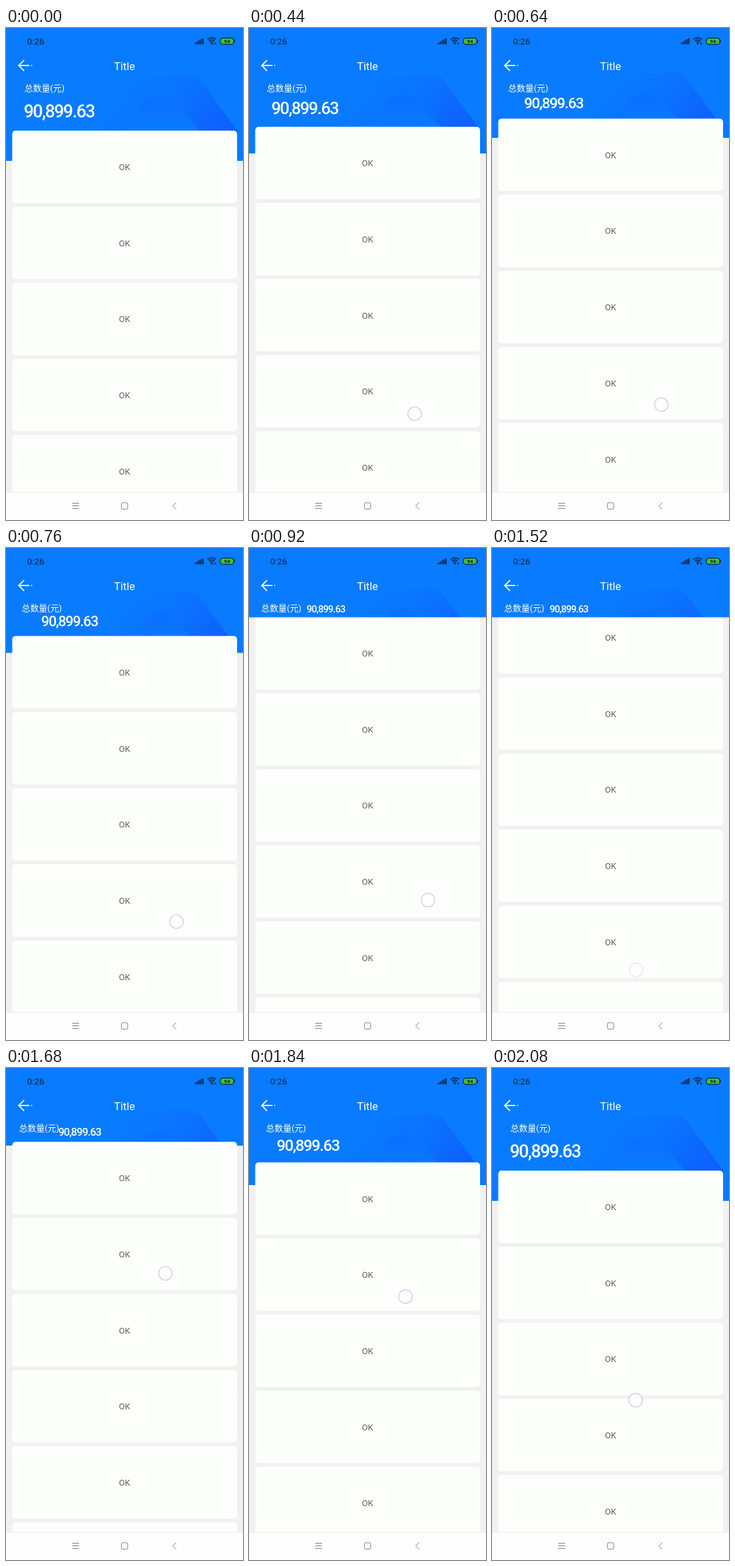
Write an HTML page that moves like this. It is 360x748 px and loops after 2120 ms.

```html
<!DOCTYPE html>
<html lang="zh-CN">
<head>
<meta charset="utf-8">
<title>Collapsing header</title>
<style>
  html, body { margin: 0; width: 100%; height: 100%; overflow: hidden; background: #f1f1f1; }
  svg { display: block; width: 100vw; height: 100vh; }
  text { font-family: Roboto, "Noto Sans CJK SC", "Noto Sans CJK", sans-serif; }
  .ok { font-size: 13px; fill: #606160; text-anchor: middle; }
  .amount { font-size: 27px; font-weight: 500; letter-spacing: -1.5px; }
</style>
</head>
<body>
<svg viewBox="0 0 360 748" preserveAspectRatio="none">
  <defs>
    <linearGradient id="band" gradientUnits="userSpaceOnUse" x1="190" y1="70" x2="320" y2="165">
      <stop offset="0" stop-color="#087bff"/>
      <stop offset=".5" stop-color="#0a73ff"/>
      <stop offset="1" stop-color="#0e60ff"/>
    </linearGradient>
    <linearGradient id="arch" gradientUnits="userSpaceOnUse" x1="0" y1="102" x2="0" y2="160">
      <stop offset="0" stop-color="#0b6fff"/>
      <stop offset="1" stop-color="#087bff"/>
    </linearGradient>
    <linearGradient id="shade" x1="0" y1="0" x2="0" y2="1">
      <stop offset="0" stop-color="#000" stop-opacity=".2"/>
      <stop offset="1" stop-color="#000" stop-opacity="0"/>
    </linearGradient>
    <clipPath id="headClip"><rect id="headBox" width="360" height="202"/></clipPath>
    <clipPath id="listClip"><rect y="105" width="360" height="601"/></clipPath>
  </defs>

  <rect width="360" height="748" fill="#f1f1f1"/>

  <g clip-path="url(#headClip)">
    <rect width="360" height="202" fill="#087bff"/>
    <g id="art">
      <path fill="url(#band)" d="M135 158L176 95Q190 76 222 74L278 71Q289 71 296 81L353 158Z"/>
      <path fill="url(#arch)" d="M178 158L209 113Q219 103 235 103Q249 103 258 112L295 158Z"/>
    </g>
  </g>

  <g clip-path="url(#listClip)">
    <g id="list"></g>
    <rect id="shadow" y="105" width="360" height="3" fill="url(#shade)"/>
  </g>

  <g fill="#0b2348">
    <text x="32" y="24.8" font-size="13.5">0:26</text>
    <g id="signal"></g>
    <g fill="none" stroke="#0b2348" stroke-width="1.5">
      <path d="M306 17.5Q312.5 12 319 17.5M308.3 20Q312.5 16.3 316.7 20M310.4 22.2Q312.5 20.3 314.6 22.2"/>
      <path stroke-width="1" d="M316 22L319 25M319 22L316 25"/>
    </g>
    <circle cx="312.5" cy="24" r="1.2"/>
    <rect x="325.5" y="15.4" width="20.5" height="9.4" rx="4" fill="#45c02c" stroke="#0b2348" stroke-width="1.3"/>
    <rect x="346.6" y="18" width="1.4" height="4.2" rx=".7"/>
    <text x="335.8" y="23" font-size="8" font-weight="700" text-anchor="middle">94</text>
  </g>

  <path fill="none" stroke="#fff" stroke-width="1.8" d="M35.5 57H19.5M27.5 48.8L19.3 57L27.5 65.2"/>
  <circle cx="39" cy="57" r=".9" fill="#fff"/>

  <g fill="#fff">
    <text x="180" y="63.8" font-size="16.5" text-anchor="middle">Title</text>
    <text id="label" y="95.8" font-size="13">总数量(元)</text>
    <text id="amount" class="amount">90,899.63</text>
  </g>

  <rect y="706" width="360" height="42" fill="#fdfefd"/>
  <rect y="705.5" width="360" height="1" fill="#ececec"/>
  <g fill="none" stroke="#808080">
    <path d="M100.5 722.5H111M100.5 726.5H111M100.5 730.5H111"/>
    <rect x="175.3" y="721.8" width="9.6" height="9.6" rx="2"/>
    <path d="M258.5 721.5L253.3 726.7L258.5 731.9"/>
  </g>

  <circle id="touch" r="10.3" fill="#fff" fill-opacity=".65" stroke="#cfd0ee" stroke-width="1.4"/>
</svg>
<script>
const LOOP = 2120, STEP = 40, FOLD = 50.5, PITCH = 115.7;

// [time, pull]; a negative pull moves the finger but not the list
const pulls = [
  [280, 0], [440, 5.8], [640, 18.2], [800, 23.5], [920, 51],
  [1200, 145], [1520, 75], [1840, 12.5], [2080, -127]
];

// x and y are where the finger would be at zero pull
const drags = [
  { from: 120, to: 1200, x: 249, y: 593, dx: 0.45 },
  { from: 1240, to: 1560, x: 210, y: 726, dx: 0.12 },
  { from: 1640, to: 2160, x: 236, y: 361.6, dx: 0.14 }
];

const $ = id => document.getElementById(id);
const set = (id, name, value) => $(id).setAttribute(name, value);
const mix = (a, b, p) => a + (b - a) * p;

function pullAt(t) {
  const i = pulls.findIndex(([time]) => time > t);
  if (i < 1) return i ? pulls[pulls.length - 1][1] : 0;
  const [t0, a] = pulls[i - 1], [t1, b] = pulls[i];
  return mix(a, b, (t - t0) / (t1 - t0));
}

function add(parent, tag, attrs, text = "") {
  const el = document.createElementNS("http://www.w3.org/2000/svg", tag);
  for (const key in attrs) el.setAttribute(key, attrs[key]);
  el.textContent = text;
  parent.append(el);
}

for (let i = 0; i < 7; i++) {
  const y = 156 + i * PITCH;
  add($("list"), "rect", { x: 9.5, y, width: 341.5, height: 110, rx: 5, fill: "#fdfffd" });
  add($("list"), "text", { x: 180, y: y + 60, class: "ok" }, "OK");
}

for (let i = 0; i < 5; i++) {
  const h = 2.5 + i * 1.7;
  add($("signal"), "rect", { x: 287 + i * 2.8, y: 24.7 - h, width: 1.9, height: h, rx: 0.5 });
}

function draw(t) {
  const pull = pullAt(t);
  const scroll = Math.max(0, pull);
  const p = Math.min(1, scroll / FOLD);

  set("list", "transform", `translate(0 ${-scroll})`);
  set("headBox", "height", mix(202, 105, p));
  set("art", "transform", `translate(0 ${-9 * p})`);
  set("shadow", "opacity", p < 1 ? 0 : 1);
  set("label", "x", mix(28, 18.5, p));
  set("amount", "transform",
    `translate(${mix(27, 87.5, p)} ${mix(135.6, 97.7, p)}) scale(${mix(1, 0.545, p)})`);

  const drag = drags.find(d => t >= d.from && t < d.to);
  set("touch", "opacity", drag ? Math.min(1, (drag.to - t) / 80) : 0);
  if (drag) set("touch", "transform", `translate(${drag.x + drag.dx * pull} ${drag.y - 1.13 * pull})`);
}

const start = performance.now();
function tick() {
  const t = (performance.now() - start) % LOOP;
  draw(Math.floor(t / STEP) * STEP);
  requestAnimationFrame(tick);
}
tick();
</script>
</body>
</html>
```
